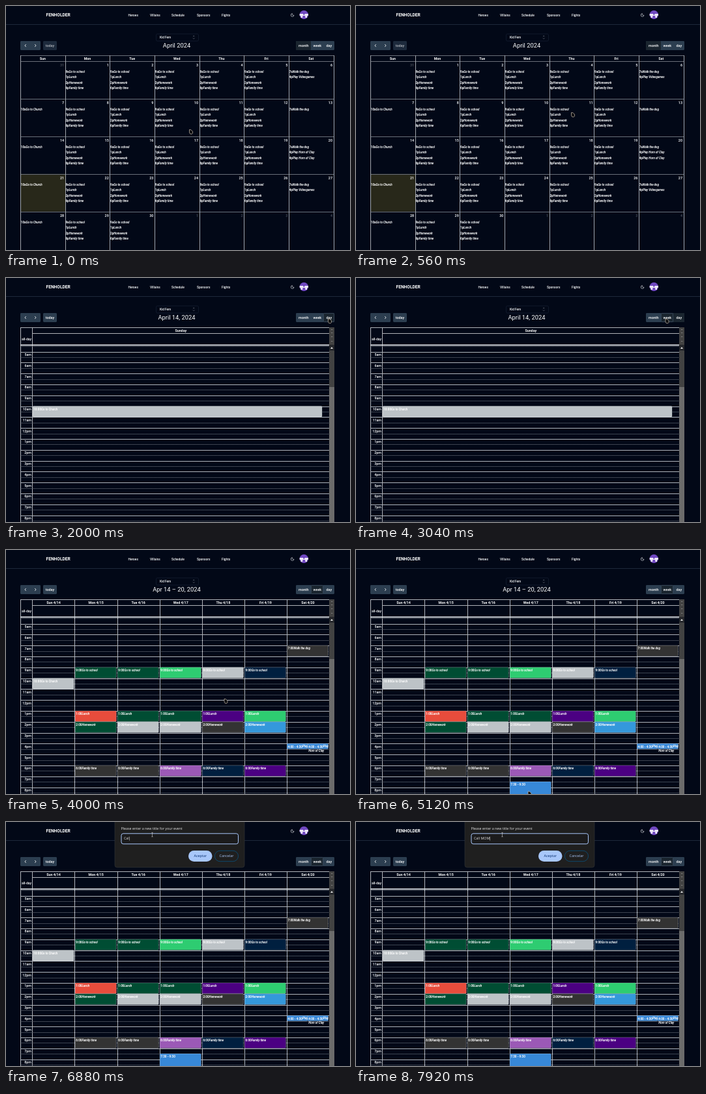
Recreate the animation shown at these times as an HTML page with a canvas. Size 528 by 376 pixels, loop 8 s.

```html
<!DOCTYPE html>
<html lang="en">
<head>
<meta charset="utf-8">
<title>Schedule</title>
<style>
html, body { margin: 0; width: 100%; height: 100%; overflow: hidden; background: #020817; }
canvas { display: block; width: 528px; height: 376px; }
</style>
</head>
<body>
<canvas id="stage"></canvas>
<script>
const W = 528, H = 376, LOOP = 8000;
const canvas = document.getElementById('stage');
const ratio = window.devicePixelRatio || 1;
canvas.width = W * ratio;
canvas.height = H * ratio;
const g = canvas.getContext('2d');

const UI = 'Roboto, Arial, sans-serif';
const DIALOG = '"Open Sans", "Noto Sans", sans-serif';
const BG = '#020817', LINE = '#b0b3b9', SOFT = '#6a6f79', BUTTON = '#2c3e50', ACTIVE = '#1a252f';
const GREEN = '#004d33', LIME = '#2ecc71', SILVER = '#bdc3c7', DARK = '#333333';
const NAVY = '#001f3f', INDIGO = '#4b0082', BLUE = '#3788d8', PURPLE = '#7048c0';
const DAYS = ['Sun', 'Mon', 'Tue', 'Wed', 'Thu', 'Fri', 'Sat'];
const GAME = 'Play Horn of Clay';

// View changes and interaction times, in ms
const DAY_AT = 1840, WEEK_AT = 3200, DRAG_AT = 4600, DROP_AT = 5120, ASK_AT = 5240, TYPE_AT = 6400;

const HOUR = 16.8;
const slotY = hour => 197.5 + (hour - 10) * HOUR;

function rect(x, y, w, h, color) {
  g.fillStyle = color;
  g.fillRect(x, y, w, h);
}

function box(x, y, w, h, r, fill, stroke, width = 0.7) {
  g.beginPath();
  g.roundRect(x, y, w, h, r);
  if (fill) { g.fillStyle = fill; g.fill(); }
  if (stroke) { g.strokeStyle = stroke; g.lineWidth = width; g.stroke(); }
}

// Draws text centred vertically on y and returns its width
function text(s, x, y, size, { style = '500', color = '#fff', align = 'left', font = UI } = {}) {
  g.font = `${style} ${size}px ${font}`;
  g.fillStyle = color;
  g.textAlign = align;
  g.fillText(s, x, y + size * 0.35);
  return g.measureText(s).width;
}

function path(points, color, width = 0.8) {
  g.beginPath();
  points.forEach(([x, y]) => g.lineTo(x, y));
  g.strokeStyle = color;
  g.lineWidth = width;
  g.stroke();
}

const hLine = (x0, x1, y, color = LINE) => rect(x0, Math.round(y), x1 - x0, 1, color);
const vLine = (x, y0, y1, color = LINE) => rect(Math.round(x), y0, 1, y1 - y0, color);

function dotted(x0, x1, y) {
  g.save();
  g.setLineDash([1, 1]);
  path([[x0, Math.round(y) + 0.5], [x1, Math.round(y) + 0.5]], '#777c86', 1);
  g.restore();
}

function label(time, title, x, y) {
  const w = text(time, x, y, 4.6, { style: 'bold' });
  text(title, x + w, y, 4.45, { style: 'italic bold' });
}

function drawHeader() {
  text('FENHOLDER', 61.5, 14, 6.67, { style: 'bold' });
  [['Heroes', 187.5], ['Villains', 221], ['Schedule', 254], ['Sponsors', 293], ['Fights', 331]]
    .forEach(([s, x]) => text(s, x, 14, 4.8));
  hLine(0, W, 28, '#1e293b');

  g.beginPath();
  g.arc(439.6, 14, 2.4, 0, 1.5 * Math.PI);
  g.arc(440.9, 12.7, 1.7, 3.84, 0.87, true);
  g.closePath();
  g.strokeStyle = '#e5e7eb';
  g.lineWidth = 0.6;
  g.stroke();

  g.save();
  g.beginPath();
  g.arc(457.3, 13.5, 6.7, 0, 7);
  g.clip();
  rect(450, 6, 15, 15, PURPLE);
  rect(450, 12, 15, 3, '#f0ecf8');
  rect(452.5, 14, 2.8, 4, '#f0ecf8');
  rect(459.3, 14, 2.8, 4, '#f0ecf8');
  rect(456, 10.5, 2.6, 3, PURPLE);
  g.restore();
}

function drawToolbar(view, title, hover) {
  box(230.5, 43, 65, 11, 1.8, BG, '#172134');
  text('Kid Fern', 236, 48.1, 4.67);
  path([[287, 47], [288.2, 45.8], [289.4, 47]], '#8b929e', 0.6);
  path([[287, 49.4], [288.2, 50.6], [289.4, 49.4]], '#8b929e', 0.6);
  text(title, 262, 61, 9.33, { align: 'center', style: '' });

  box(22, 54, 31, 14, 1.4, BUTTON);
  path([[30.8, 59], [28.9, 61], [30.8, 63]], '#fff');
  path([[44.2, 59], [46.1, 61], [44.2, 63]], '#fff');
  g.globalAlpha = view === 'month' ? 0.65 : 1;
  box(57, 54, 21, 14, 1.4, BUTTON);
  text('today', 67.4, 61, 5.45, { align: 'center' });
  g.globalAlpha = 1;

  box(445, 54, 59, 14, 1.4, BUTTON);
  [['month', 445, 23], ['week', 468, 19], ['day', 487, 17]].forEach(([name, x, w]) => {
    if (name === view || name === hover) {
      box(x, 54, w, 14, 1.2, ACTIVE);
      if (name === hover || (view === 'week' && name === view)) {
        box(x + 0.4, 54.4, w - 0.8, 13.2, 1.2, null, '#46566a');
      }
    }
    text(name, x + w / 2 + 0.3, 61, 5.45, { align: 'center' });
  });
}

function drawMonth() {
  const colX = c => 22 + c * 68.65, rowY = r => 84.7 + r * 58;
  const school = [['9a', 'Go to school'], ['1p', 'Lunch'], ['2p', 'Homework'], ['6p', 'Family time']];
  const walk = ['7a', 'Walk the dog'], play = ['4p', 'Play Videogames'], game = ['4p', GAME];
  const saturdays = [[walk, play], [walk], [walk, game, game], [walk, play], []];

  rect(22, rowY(3), 69, 58, '#28281a');
  hLine(22, 503, 76, SOFT);
  for (let r = 0; r < 5; r++) hLine(22, 503, rowY(r), SOFT);
  for (let c = 0; c <= 7; c++) vLine(colX(c), 76, H, '#a0a4ab');
  DAYS.forEach((d, c) => text(d, colX(c + 0.5), 81, 5.33, { style: 'bold', align: 'center' }));

  for (let r = 0; r < 5; r++) {
    for (let c = 0; c < 7; c++) {
      const n = r * 7 + c, inside = n > 0 && n <= 30;
      const date = n === 0 ? 31 : inside ? n : n - 30;
      text(date, colX(c + 1) - 1.5, rowY(r) + 6.2, 5.5,
        { align: 'right', color: inside ? '#fff' : '#4e525d' });
      if (!inside) continue;
      const list = c === 0 ? [['10a', 'Go to Church']] : c === 6 ? saturdays[r] : school;
      list.forEach(([t, s], i) => label(t, s, colX(c) + 0.8, rowY(r) + 16.4 + i * 8.5));
    }
  }
}

function drawTimeGrid(heads) {
  const step = 455.5 / heads.length;
  hLine(22, 496, 76);
  hLine(40, 496, 85);
  for (let h = 4.5; h < 21; h += 0.5) {
    if (h % 1) dotted(22, 496, slotY(h));
    else hLine(22, 496, slotY(h));
  }
  for (let h = 5; h <= 20; h++) {
    text((h % 12 || 12) + (h < 12 ? 'am' : 'pm'), 39, slotY(h) + 4.6, 5.33, { align: 'right' });
  }
  text('all-day', 39, 94.3, 5.1, { align: 'right' });
  vLine(22, 76, H);
  heads.forEach((s, i) => {
    vLine(40.4 + i * step, 76, H);
    text(s, 40.5 + (i + 0.5) * step, 81, 5.33, { style: 'bold', align: 'center' });
  });
  rect(22, 102.5, 474, 1.8, '#e2e4e8');

  rect(496, 76, 8, 300, '#424242');
  rect(496, 103, 8, 9, '#26282c');
  rect(496, 168, 8, 208, '#6b6b6b');
  [79, 84, 90, 97].forEach(y => rect(499, y, 2.4, 0.8, '#8c8c8c'));
  g.beginPath();
  [[498, 109], [500, 106.3], [502, 109]].forEach(p => g.lineTo(...p));
  g.fillStyle = '#e6e6e6';
  g.fill();
}

function block(x, w, from, to, color, time, title) {
  const y = slotY(from), h = (to - from) * HOUR;
  box(x, y, w, h - 0.3, 1.2, color, 'rgba(255,255,255,0.5)', 0.5);
  label(time, title, x + 1.2, y + 4.6);
}

function drawDay() {
  drawTimeGrid(['Sunday']);
  block(41, 444, 10, 11, SILVER, '10:00', 'Go to Church');
}

function drawWeek() {
  const colX = c => 41 + c * 65.05, w = 63.2;
  drawTimeGrid(DAYS.map((d, i) => `${d} 4/${14 + i}`));
  block(colX(0), w, 10, 11, SILVER, '10:00', 'Go to Church');
  const rows = [
    [9, '9:00', 'Go to school', [GREEN, GREEN, LIME, SILVER, NAVY]],
    [13, '1:00', 'Lunch', ['#e74c3c', GREEN, GREEN, INDIGO, LIME]],
    [14, '2:00', 'Homework', [GREEN, SILVER, SILVER, DARK, '#3498db']],
    [18, '6:00', 'Family time', [DARK, DARK, '#9b59b6', NAVY, INDIGO]]
  ];
  rows.forEach(([h, time, title, colors]) =>
    colors.forEach((color, i) => block(colX(i + 1), w, h, h + 1, color, time, title)));
  block(colX(6), w, 7, 8, DARK, '7:00', 'Walk the dog');

  [0, 1].forEach(i => {
    const x = colX(6) + i * 31.7;
    g.save();
    g.beginPath();
    g.rect(x - 0.5, 297, 32.5, 20);
    g.clip();
    block(x, 31.5, 16, 16.5, BLUE, '4:00 - 4:30', 'Play');
    if (i) text(GAME.slice(5), x + 1.2, 309.3, 4.45, { style: 'italic bold' });
    g.restore();
  });
}

function drawSelection(t) {
  if (t < DRAG_AT) return;
  const p = Math.min(1, (t - DRAG_AT) / (DROP_AT - DRAG_AT));
  const end = 20 + Math.floor(p * 3) / 2;
  const time = `${Math.floor(end) - 12}:${end % 1 ? '30' : '00'}`;
  block(236.1, 63.2, 19.5, end, BLUE, `7:30 - ${time}`, '');
}

function drawDialog(t) {
  if (t < ASK_AT) return;
  g.globalAlpha = Math.min(1, (t - ASK_AT + 40) / 160);
  box(167, -12, 199, 82, 3.5, '#1f1f1f', '#34363a', 0.6);
  const font = DIALOG, color = '#e3e3e3', style = '';
  text('grid-planner-one.app', 176.5, -3.2, 5.6, { font, color, style });
  text('Please enter a new title for your event', 176.5, 10, 5.35, { font, color, style });
  box(177, 17.8, 179.5, 16, 3, '#1b1b1c', '#a8c7fa', 1);
  const count = Math.max(0, Math.min(8, Math.floor((t - TYPE_AT) / 165) + 1));
  const w = text('Call MOM'.slice(0, count), 181, 25.6, 5.35, { font, color, style });
  if (t % 1060 < 530) rect(181 + w + 0.3, 22.6, 0.5, 6, color);
  box(280, 44, 36.5, 17, 8.5, '#a8c7fa');
  text('Aceptar', 298.2, 52.4, 5.4, { font, color: '#062e6f', align: 'center' });
  box(320.3, 44.3, 36.2, 16.4, 8.2, null, '#0a527f', 0.8);
  text('Cancelar', 338.5, 52.4, 5.4, { font, color: '#a8c7fa', align: 'center' });
  g.globalAlpha = 1;
}

// Pointer stops: time, x, y
const STOPS = [
  [0, 281.5, 190.5], [250, 281.5, 190.5], [1200, 476.5, 86], [1700, 494.5, 63], [2400, 494.5, 63],
  [2900, 475, 63], [3400, 475, 63], [4000, 335, 229.5], [4500, 262, 359], [4650, 262, 359],
  [5120, 264, 372], [5300, 264, 368], [5700, 246, 52.5], [5900, 246, 52.5], [6300, 224.5, 19.5], [LOOP, 224.5, 19.5]
];

function drawPointer(t) {
  const i = STOPS.findIndex(s => s[0] > t);
  const [t0, x0, y0] = STOPS[i - 1], [t1, x1, y1] = STOPS[i];
  const u = (t - t0) / (t1 - t0), e = u * u * (3 - 2 * u);
  const x = x0 + (x1 - x0) * e, y = y0 + (y1 - y0) * e;
  if (t > 6200) {
    const bar = (...points) => path(points, '#d0d0d0', 0.6);
    bar([x - 1.2, y - 3.2], [x + 1.2, y - 3.2]);
    bar([x, y - 3.2], [x, y + 3.2]);
    bar([x - 1.2, y + 3.2], [x + 1.2, y + 3.2]);
    return;
  }
  g.beginPath();
  [[0, 0], [2.6, 0.3], [5, 2.8], [5, 5.4], [3.8, 6.8], [1.2, 6.6], [0, 4.6]]
    .forEach(([a, b]) => g.lineTo(x + a, y + b));
  g.closePath();
  g.fillStyle = '#0c0d10';
  g.fill();
  g.strokeStyle = '#cdbfae';
  g.lineWidth = 0.7;
  g.stroke();
}

function draw(t) {
  g.setTransform(ratio, 0, 0, ratio, 0, 0);
  rect(0, 0, W, H, BG);
  drawHeader();
  const view = t < DAY_AT ? 'month' : t < WEEK_AT ? 'day' : 'week';
  const title = { month: 'April 2024', day: 'April 14, 2024', week: 'Apr 14 – 20, 2024' }[view];
  const hover = t > 1600 && t < 2640 ? 'day' : t >= 2760 && t < 3520 ? 'week' : '';
  drawToolbar(view, title, hover);
  if (view === 'month') drawMonth();
  else if (view === 'day') drawDay();
  else {
    drawWeek();
    drawSelection(t);
    drawDialog(t);
  }
  drawPointer(t);
}

const start = performance.now();
function tick() {
  draw((performance.now() - start) % LOOP);
  requestAnimationFrame(tick);
}
tick();
</script>
</body>
</html>
```
